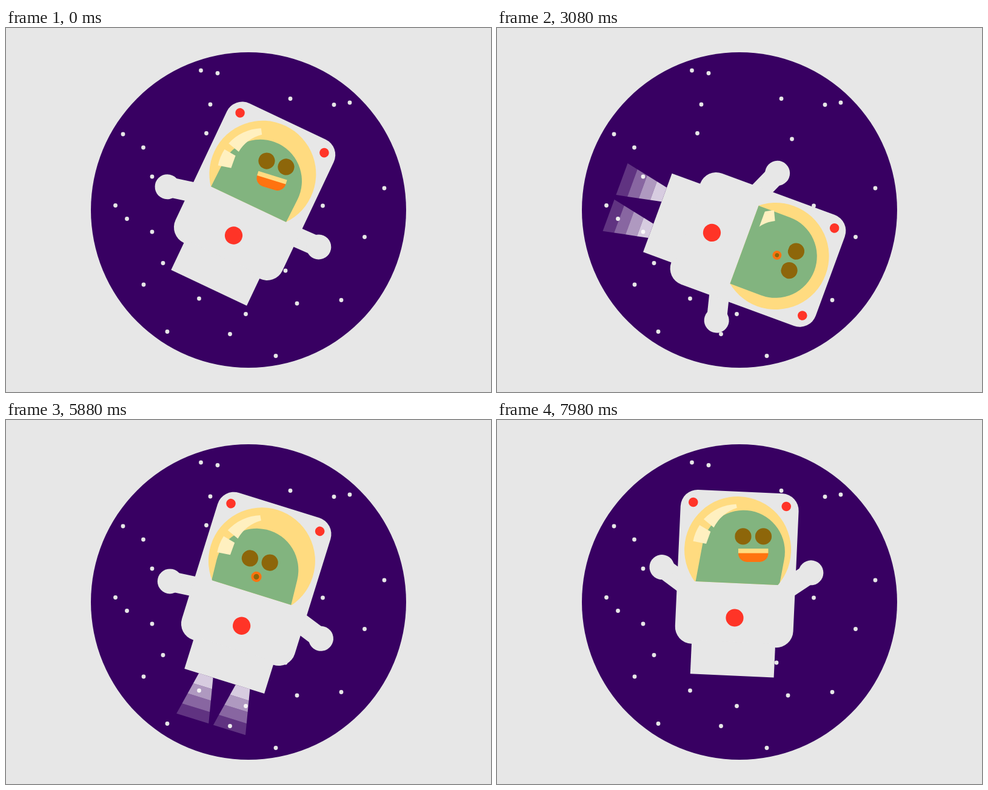
Animation of 800x600 px, one loop 8 s. Source, as an HTML page with a canvas:

```html
<!DOCTYPE html>
<html lang="en">
<head>
<meta charset="utf-8">
<title>Drifting spaceman</title>
<style>
  html, body { margin: 0; width: 100%; height: 100%; overflow: hidden; background: #e7e7e7; }
  canvas { display: block; }
</style>
</head>
<body>
<canvas id="stage" width="800" height="600"></canvas>
<script>
const ctx = document.getElementById('stage').getContext('2d');
const LOOP = 8000, STEP = 70, RAD = Math.PI / 180;
const C = {
  suit: '#e7e7e7', space: '#380062', skin: '#82b47f', glass: '#ffdb80',
  shine: '#fff0c0', red: '#ff3427', eye: '#8d660a', lips: '#ff7310'
};
const GLASS_Y = -112, GLASS_R = 88, CHORD_Y = -57;

const stars = [
  [321.5, 70], [349, 74.5], [469, 116.5], [541, 126.5], [567, 123], [337, 126], [330.5, 173.5],
  [193, 175], [226.5, 197], [241, 245], [180.5, 292.5], [199.5, 314.5], [241, 336], [259, 387.5],
  [227, 423], [318.5, 446], [266, 500.5], [369.5, 504.5], [395.5, 471.5], [445, 540.5], [480, 454],
  [553, 448.5], [461, 400], [591.5, 344.5], [522.5, 293], [624, 264], [486.5, 183]
];

// Monotone cubic through the given points: smooth, without overshoot.
function track(times, values) {
  const n = times.length;
  const slope = i => (values[i + 1] - values[i]) / (times[i + 1] - times[i]);
  const tangent = i => {
    if (i === 0) return slope(0);
    if (i === n - 1) return slope(n - 2);
    const a = slope(i - 1), b = slope(i);
    return a * b <= 0 ? 0 : 2 * a * b / (a + b);
  };
  return t => {
    if (t <= times[0]) return values[0];
    if (t >= times[n - 1]) return values[n - 1];
    let i = 0;
    while (t > times[i + 1]) i++;
    const h = times[i + 1] - times[i], u = (t - times[i]) / h, v = 1 - u;
    return values[i] * (1 + 2 * u) * v * v + values[i + 1] * u * u * (3 - 2 * u)
      + h * u * v * (tangent(i) * v - tangent(i + 1) * u);
  };
}

const flight = [0, 980, 1680, 2450, 2870, 3200, 3360, 3640, 3850, 4200, 4830, 5110, 5950, 6790, 7560, 7980];
const poses = [0, 980, 2450, 3640, 4830, 6790, 7980];
const body = {
  x: track(flight, [375.5, 329.5, 319, 334, 430, 322, 335, 352.5, 360, 367, 393, 393, 388, 372, 376, 392]),
  y: track(flight, [342, 286.5, 278, 250.5, 334, 338, 331, 303, 268, 272, 333.5, 341, 339, 331.5, 338, 326]),
  turn: track(flight, [25.3, 84.8, 108, 134.7, 133, 92, 72, 28, 40, 58, 13.9, 13, 18, 47, 70, 2.6])
};
const arm = {
  left: track(poses, [13.3, 13.7, -39, -4.7, 17.6, -12.4, -34]),
  right: track(poses, [-1.6, 11, -37, 9.5, 20.7, 17, -36])
};
const head = {
  tilt: track(poses, [1.4, 7.5, 0, 0.6, 0, -6, 8]),
  y: track(poses, [-100, -100, -120.5, -101, -89.6, -103, -110])
};
const face = {
  x: track(poses, [13.3, 8.2, -3.7, 0.4, 17.5, -20, 24.6]),
  y: track(poses, [-136.8, -114.2, -155.2, -126.1, -117.7, -109.3, -135.3]),
  turn: track(poses, [-8, -6.8, 0, -0.7, -10.5, -0.8, -2.6])
};
const lidTop = track([4400, 4700, 5000, 5300], [-14, -4.5, -4.5, -14]);
const lidBottom = track([1900, 2300, 2700, 3100], [14, 0, 0, 14]);
const smileSize = track([0, 980, 1400, 7600, 7900], [1, 0.8, 0.25, 0.3, 1]);
const ringSize = track([2450, 6790], [5.2, 7]);

function shape(color, draw) {
  ctx.fillStyle = color;
  ctx.beginPath();
  draw();
  ctx.fill();
}
const disc = (x, y, r, color) => shape(color, () => ctx.arc(x, y, r, 0, 7));
const box = (x, y, w, h, color) => shape(color, () => ctx.rect(x, y, w, h));

function layer(draw) {
  ctx.save();
  draw();
  ctx.restore();
}

function polar(r, deg) {
  return [r * Math.cos(deg * RAD), r * Math.sin(deg * RAD)];
}

function flame(side) {
  const half = y => 12.3 + 15.5 * y / 74.5;
  for (let i = 0; i < 4; i++) {
    const a = i * 18.6, b = a + 18.6, mid = side * 31.8;
    shape(`rgba(255,255,255,${0.8 - 0.2 * i})`, () => {
      ctx.moveTo(mid - half(a), 95.5 + a);
      ctx.lineTo(mid + half(a), 95.5 + a);
      ctx.lineTo(mid + half(b), 95.5 + b);
      ctx.lineTo(mid - half(b), 95.5 + b);
    });
  }
}

function drawArm(side, angle) {
  layer(() => {
    ctx.translate(side * 69, -41);
    ctx.scale(side, 1);
    ctx.rotate(angle * RAD);
    box(0, -16.5, 66, 33, C.suit);
    disc(66, 0, 20.5, C.suit);
  });
}

function drawSuit(t) {
  drawArm(-1, arm.left(t));
  drawArm(1, arm.right(t));
  shape(C.suit, () => ctx.roundRect(-97.5, -208, 195, 254, 28));
  box(-69, 40, 138, 55.5, C.suit);
  disc(0, 0, 14.6, C.red);
  disc(-76.8, -187.2, 7.8, C.red);
  disc(76.8, -187.2, 7.8, C.red);
}

function drawMouth(t) {
  if (t < 1400 || t >= 7600) {
    const s = smileSize(t);
    ctx.translate(0, 20);
    ctx.scale(s, 0.3 + 0.7 * s);
    shape(C.lips, () => ctx.roundRect(-24.7, 4, 49.4, 18, [0, 0, 14, 14]));
    box(-24.7, 0, 49.4, 7.5, C.glass);
  } else if (t >= 3400 && t < 4400) {
    shape(C.eye, () => {
      ctx.moveTo(-11, 34);
      ctx.quadraticCurveTo(-14, 33, -12.5, 29);
      ctx.bezierCurveTo(-9, 17, 9, 17, 12.5, 29);
      ctx.quadraticCurveTo(14, 33, 11, 34);
    });
  } else if (t >= 4400 && t < 4950) {
    box(-40.5, 20, 80.5, 4, C.eye);
  } else {
    const r = ringSize(t);
    disc(0, 27.5, r + 2, C.lips);
    disc(0, 27.5, r - 2, C.eye);
  }
}

function drawFace(t) {
  ctx.translate(face.x(t), face.y(t));
  ctx.rotate(face.turn(t) * RAD);
  layer(() => {
    const top = lidTop(t);
    ctx.beginPath();
    ctx.rect(-40, top, 80, lidBottom(t) - top);
    ctx.clip();
    disc(-16.75, 0, 13.6, C.eye);
    disc(16.75, 0, 13.6, C.eye);
  });
  drawMouth(t);
}

// The reflection stays upright on screen while the helmet turns under it.
function drawShine(turn) {
  ctx.beginPath();
  ctx.rect(-100, -220, 200, GLASS_Y + 42 + 220);
  ctx.clip();
  ctx.translate(0, GLASS_Y);
  ctx.rotate(-turn * RAD);
  const inner = 53 + 0.2 * Math.abs(85 - turn);
  shape(C.shine, () => {
    ctx.arc(0, 0, 75.5, -138 * RAD, -92 * RAD);
    ctx.lineTo(...polar(inner, -91));
    ctx.quadraticCurveTo(...polar((inner + 54) * 0.54, -114), ...polar(54, -137));
  });
  shape(C.shine, () => {
    ctx.arc(0, 0, 75, -169 * RAD, -147 * RAD);
    ctx.lineTo(...polar(54, -146));
    ctx.lineTo(...polar(53, -169));
  });
}

function drawHelmet(t, turn) {
  ctx.beginPath();
  ctx.rect(-100, -220, 200, CHORD_Y + 220);
  ctx.clip();
  disc(0, GLASS_Y, GLASS_R, C.glass);
  ctx.beginPath();
  ctx.arc(0, GLASS_Y, GLASS_R, 0, 7);
  ctx.clip();
  layer(() => {
    ctx.translate(0, -42);
    ctx.rotate(head.tilt(t) * RAD);
    ctx.translate(0, head.y(t) + 42);
    shape(C.skin, () => {
      ctx.arc(0, 0, 68.5, Math.PI, 0);
      ctx.lineTo(68.5, 110);
      ctx.lineTo(-68.5, 110);
    });
  });
  layer(() => drawShine(turn));
  layer(() => drawFace(t));
}

function draw(t) {
  box(0, 0, 800, 600, C.suit);
  disc(400, 300, 260, C.space);
  stars.forEach(([x, y]) => disc(x, y, 3.4, C.suit));

  const turn = body.turn(t);
  const place = () => {
    ctx.translate(body.x(t), body.y(t));
    ctx.rotate(turn * RAD);
  };
  layer(() => {
    ctx.beginPath();
    ctx.arc(400, 300, 260, 0, 7);
    ctx.clip();
    place();
    const early = t >= 2380 && t < 3400;
    if (early || (t >= 4950 && t < 7600)) flame(-1);
    if (early || (t >= 4950 && t < 6740)) flame(1);
  });
  layer(() => {
    place();
    drawSuit(t);
    layer(() => drawHelmet(t, turn));
  });
}

const start = performance.now();
function tick() {
  const t = (performance.now() - start) % LOOP;
  draw(t - t % STEP);
  requestAnimationFrame(tick);
}
tick();
</script>
</body>
</html>
```
